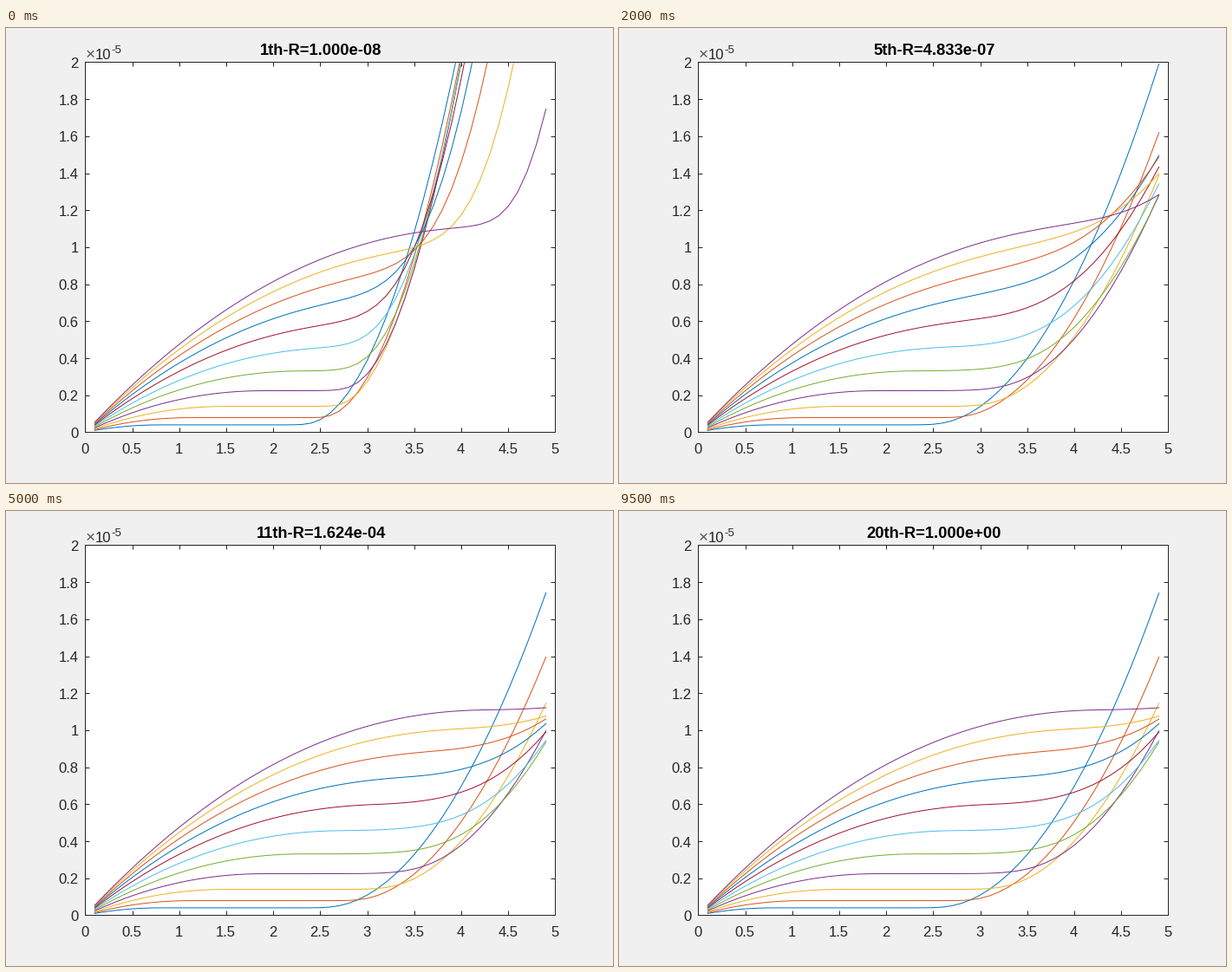
Recreate the animation shown at these times as a matplotlib script. Size 700 px wide and 525 px high, loop 10 s.

```python
import numpy as np
import matplotlib.pyplot as plt
from matplotlib.animation import FuncAnimation

W, H, DPI = 700, 525, 100
PX = 72 / DPI                      # points per pixel
LEFT, RIGHT, TOP, BOTTOM = 91.45, 633.45, 39.45, 466.45
STEPS, INTERVAL = 20, 500
INK = "#262626"
COLORS = ["#0072BD", "#D95319", "#EDB120", "#7E2F8E",
          "#77AC30", "#4DBEEE", "#A2142F"]

plt.rcParams["font.family"] = "Liberation Sans"

x = np.arange(1, 50) / 10
resistances = np.logspace(-8, 0, STEPS)
curve = np.arange(11)              # from the lowest to the highest plateau


def through(*values):
    """Smooth variation over the curves, fixed at five of them."""
    return np.polyval(np.polyfit([0, 2, 5, 8, 10], values, 4), curve)


def logistic(v):
    return 1 / (1 + np.exp(-v))


def softplus(v, width):
    return width * np.logaddexp(0, v / width)


knee = through(.81, 1.515, 2.735, 3.78, 4.26)
plateau = .061 * knee ** 2

# Upturn at the lowest and at the highest resistance.
first_onset = through(2.31, 2.63, 2.87, 3.42, 4.37)
last_onset = through(2.52, 3.07, 3.66, 4.38, 5.60)
first_slope = through(.86, 1.0, 1.1, 1.2, 1.45)
last_slope = .548
first_softness = through(.08, .08, .25, .35, .23)
last_softness = through(.10, .15, .48, .70, .70)

# Higher curves settle later.
onset_middle = 4.5 + .025 * curve ** 2
fade_middle = through(.6, 1.15, 2.5, 3.2, 3.55)
fade_rate = .8 + .15 * curve


def fade(step):
    return logistic(fade_rate * (fade_middle - step))


def currents(step):
    """Current in units of 1e-5, one row per curve."""
    shift = logistic(1.25 * (step - onset_middle))
    left = fade(step) / fade(1)
    onset = first_onset + (last_onset - first_onset) * shift
    slope = last_slope + (first_slope - last_slope) * left
    softness = last_softness + (first_softness - last_softness) * left

    remaining = np.clip(1 - x / knee[:, None], 0, 1)
    saturated = plateau[:, None] * (1 - remaining ** 2.1)
    upturn = slope[:, None] * softplus(x - onset[:, None], softness[:, None])
    return saturated + upturn ** 2


fig = plt.figure(figsize=(W / DPI, H / DPI), dpi=DPI, facecolor="#F0F0F0")
ax = fig.add_axes([LEFT / W, 1 - BOTTOM / H, (RIGHT - LEFT) / W, (BOTTOM - TOP) / H])
ax.set(xlim=(0, 5), ylim=(0, 2))
ax.set_xticks(np.arange(0, 5.1, .5))
ax.set_yticks(np.arange(0, 2.1, .2))
ax.tick_params(direction="in", top=True, right=True, length=5.4 * PX, width=PX,
               color=INK, labelbottom=False, labelleft=False)
for spine in ax.spines.values():
    spine.set(linewidth=PX, edgecolor=INK)


def label(px, py, text, size=16.67, color=INK, **kwargs):
    return fig.text(px / W, 1 - py / H, text, fontsize=size * PX, color=color,
                    va="baseline", **kwargs)


for v in ax.get_xticks():
    label(LEFT - .5 + v / 5 * (RIGHT - LEFT), 491, f"{v:.2g}", ha="center")
for v in ax.get_yticks():
    label(83.5, BOTTOM - v / 2 * (BOTTOM - TOP) + 6.5, f"{v:.2g}", ha="right")
label(91.5, 36, "×", size=19, color="#555555")
label(103, 36, "10")
label(121.3, 29, "-5", size=13.33)

title = label(363.2, 31, "", size=18.33, color="black", ha="center", weight="bold")
lines = [ax.plot([], [], color=COLORS[i % 7], lw=PX)[0] for i in curve]


def update(frame):
    step = frame + 1
    for line, y in zip(lines, currents(step)):
        line.set_data(x, y)
    title.set_text(f"{step}th-R={resistances[frame]:.3e}")
    return [*lines, title]


anim = FuncAnimation(fig, update, frames=STEPS, interval=INTERVAL,
                     repeat=True, repeat_delay=0)
plt.show()
```
